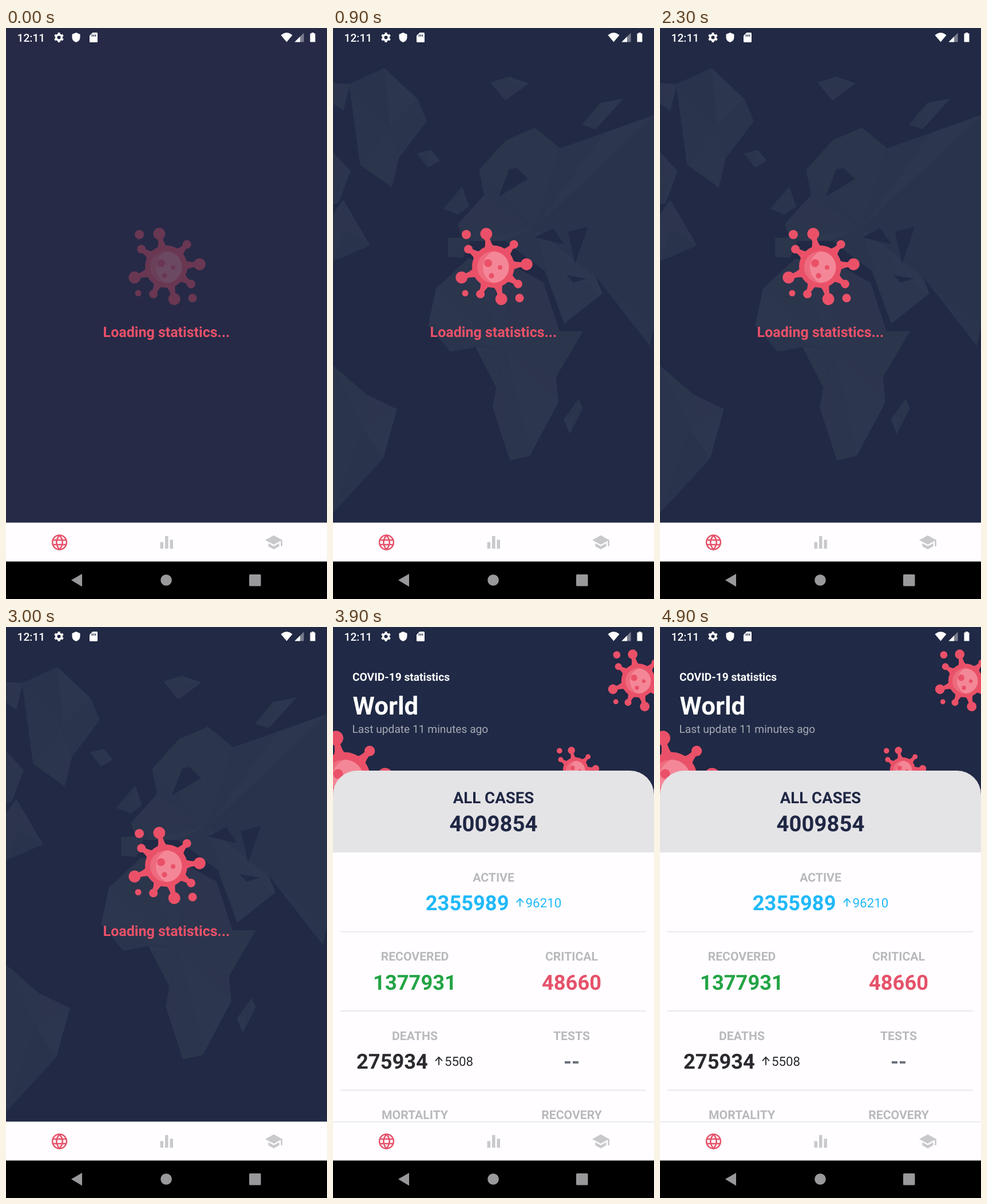
Recreate the animation shown at these times as an HTML page. Size 561x998 px, loop 5000 ms.

```html
<!DOCTYPE html>
<html lang="en">
<head>
<meta charset="utf-8">
<title>Statistics app</title>
<style>
html, body { margin: 0; width: 100%; height: 100%; overflow: hidden; background: #202945; }
svg { display: block; width: 100vw; height: 100vh; }
text { font-family: Roboto, Arial, sans-serif; text-rendering: geometricPrecision; }
.b { font-weight: 700; }
.m { text-anchor: middle; }
.label { font-size: 21.2px; fill: #b9b9bd; }
.num { font-size: 36.3px; }
.diff { font-size: 22.3px; text-anchor: end; }
</style>
</head>
<body>
<svg viewBox="0 0 561 998" preserveAspectRatio="none">
  <defs>
    <g id="virus"></g>
    <clipPath id="coast"></clipPath>
    <clipPath id="window"><rect y="394" width="561" height="470"/></clipPath>
  </defs>

  <g id="loading">
    <rect id="back" width="561" height="865" fill="#212944"/>
    <g id="map"></g>
    <use id="logo" href="#virus" x="280" y="417"/>
    <text class="b m" x="280.5" y="540" font-size="25" fill="#ea5168">Loading statistics...</text>
  </g>

  <g id="stats">
    <rect width="561" height="394" fill="#202945"/>
    <use href="#virus" transform="translate(533.5 93.5) scale(.8)"/>
    <use href="#virus" transform="translate(424 250) scale(.6)"/>
    <use href="#virus" transform="translate(20 264) scale(1.22)"/>
    <g fill="#fff">
      <text class="b" x="34" y="93.5" font-size="19.2">COVID-19 statistics</text>
      <text class="b" x="34.5" y="152.5" font-size="43.8">World</text>
      <text x="33.5" y="185" font-size="19.2" fill="#a6a9b5">Last update 11 minutes ago</text>
    </g>
    <path d="M0 394V293A42 42 0 0 1 42 251H519A42 42 0 0 1 561 293V394Z" fill="#e4e3e6"/>
    <g class="b m" fill="#1f2744">
      <text x="280.5" y="308" font-size="27.6">ALL CASES</text>
      <text x="280.5" y="356.5" font-size="38.3">4009854</text>
    </g>
    <rect y="394" width="561" height="471" fill="#fffdff"/>
    <g clip-path="url(#window)"><g id="list"></g></g>
  </g>

  <rect y="864.5" width="561" height="69" fill="#fffdff"/>
  <rect id="edge" y="864" width="561" height="1.5" fill="#e6e5e8"/>
  <g transform="translate(93.5 899)" fill="none" stroke="#e5526a" stroke-width="2.5">
    <circle r="12.4"/>
    <path d="M0 -12.4Q-10.4 0 0 12.4Q10.4 0 0 -12.4M-11.5 -4.1H11.5M-11.5 4.1H11.5"/>
  </g>
  <g fill="#c9c9cd">
    <path d="M269.5 898.5h5.5V910h-5.5zM278 888h5.5V910H278zM286.5 894.5H292V910h-5.5z"/>
    <path transform="translate(451.6 882.6) scale(1.364)" d="M5 13.18v4L12 21l7-3.82v-4L12 17l-7-3.82zM12 3L1 9l11 6 9-4.91V17h2V9L12 3z"/>
  </g>

  <rect y="932.5" width="561" height="66"/>
  <g fill="#99999c">
    <path d="M114 965L133 954V976.5Z"/>
    <circle cx="280" cy="965" r="9.8"/>
    <rect x="425" y="955" width="20.5" height="20.5" rx="1.5"/>
  </g>

  <g fill="#fff">
    <text x="19.5" y="23.8" font-size="19.2" font-weight="500">12:11</text>
    <g fill="none" stroke="#fff" transform="translate(92.5 16.5)">
      <circle r="4.8" stroke-width="3.6"/>
      <circle r="7.2" stroke-width="2.6" pathLength="12" stroke-dasharray="1" stroke-dashoffset="-.5"/>
    </g>
    <path d="M122.5 8L129.5 11V16C129.5 20.5 127 23.5 122.5 25C118 23.5 115.5 20.5 115.5 16V11Z"/>
    <path d="M151.5 8H158.5Q160 8 160 9.5V23.5Q160 25 158.5 25H147.5Q146 25 146 23.5V13.5Z"/>
    <path d="M150.5 11.5V15M153.5 11.5V15M156.5 11.5V15" stroke="#202945" stroke-width="1.5"/>
    <path d="M480.5 12.5Q490.5 4 500.5 12.5L490.5 24.5Z"/>
    <path d="M520.5 8.5V24.5H504.5Z" opacity=".4"/>
    <path d="M514 15V24.5H504.5Z"/>
    <path d="M534 8H538V9.5H540.5V24.5H531.5V9.5H534Z"/>
  </g>
</svg>
<script>
const $ = id => document.getElementById(id);
const RED = '#ea5168';
const circle = (x, y, r, fill = RED) => `<circle cx="${x}" cy="${y}" r="${r}" fill="${fill}"/>`;

// Virus: long and short arms alternate around a spotted body
const arm = (deg, i) => {
  const [len, r] = i % 2 ? [53, 7.5] : [58.5, 10.5];
  return `<g transform="rotate(${deg})">${circle(len, 0, r)}
    <path fill="${RED}" d="M34 -9Q39 -4 ${len} -4V4Q39 4 34 9Z"/></g>`;
};
$('virus').innerHTML = [-102, -47, -4, 35, 76, 115, 161, 215].map(arm).join('') +
  circle(-47, -56, 8) + circle(46, 55, 7.5) + circle(-49, 46.5, 5.5) +
  circle(0, 0, 37) + circle(-.5, 1, 27.5, '#ee6b7e') +
  '<path fill="#f48797" d="M0 -26.5A27.5 27.5 0 0 1 0 28.5A30 30 0 0 1 0 -26.5Z"/>' +
  circle(-9, -6, 7) + circle(12, 1.5, 4) + circle(-3, 16, 4.7);

// World map: rough coastlines, each cut into faintly shaded facets
const land = [
  '28,98 90,70 148,124 164,163 115,228 103,279 47,239',
  '0,96 30,98 18,145 0,132',
  '0,217 31,250 10,306 0,308',
  '0,325 18,300 65,380 0,408',
  '146,219 171,213 187,232 166,244',
  '275,95 308,85 342,97 301,127',
  '435,169 467,131 508,123 459,177',
  '192,316 226,277 238,312 218,326',
  '403,684 429,648 437,664 414,710',
  '0,590 58,640 112,666 88,752 0,848',
  '255,248 302,196 353,174 397,210 474,183 561,152 561,522 554,556 459,434 471,464 ' +
    '404,517 370,425 300,372 240,372 228,402 201,400 201,367 226,366 218,343 264,292',
  '166,520 180,455 236,403 305,410 368,445 396,530 437,530 390,610 394,654 344,748 309,756 279,663 285,628 249,558 205,566'
];
const seas = ['308,247 321,245 341,264 290,294', '353,366 385,350 404,378', '411,356 445,348 423,412', '408,432 444,438 420,445'];

let seed = 7;
const random = () => (seed = seed * 16807 % 2147483647) / 2147483647;
const poly = (pts, fill) => `<polygon points="${pts}" fill="${fill}"/>`;
const mean = (pts, axis) => pts.reduce((sum, p) => sum + +p.split(',')[axis], 0) / pts.length;
const facets = shape => {
  const pts = shape.split(' '), hub = `${mean(pts, 0)},${mean(pts, 1)}`;
  return pts.map((p, i) =>
    poly(`${hub} ${p} ${pts[(i + 1) % pts.length]}`, `rgba(255,255,255,${random() * .016})`)).join('');
};
const ground = land.map(p => poly(p, '#29334b')).join('');
$('coast').innerHTML = ground;
$('map').innerHTML = ground + `<g clip-path="url(#coast)">${land.map(facets).join('')}</g>` +
  seas.map(p => poly(p, '#212944')).join('');

// Statistics list
const text = (cls, x, y, s, fill = '') =>
  `<text class="${cls}" x="${x}" y="${y}" ${fill && `fill="${fill}"`}>${s}</text>`;
const LEFT = 143, MID = 280.5, RIGHT = 417, ROW = 138.5, GREY = '#6b717b';
const cells = [
  [0, MID, 'ACTIVE', '2355989', '#21b9f8', '96210'],
  [1, LEFT, 'RECOVERED', '1377931', '#23a445'],
  [1, RIGHT, 'CRITICAL', '48660', '#e5526a'],
  [2, LEFT, 'DEATHS', '275934', '#2b2a30', '5508'],
  [2, RIGHT, 'TESTS', '--', GREY],
  [3, LEFT, 'MORTALITY', '6.88%', GREY],
  [3, RIGHT, 'RECOVERY', '34.36%', GREY]
];
const cell = ([row, x, label, value, color, diff]) => {
  const y = 444.8 + row * ROW, base = y + 50.5;
  const head = text('b m label', x, y, label);
  if (!diff) return head + text('b m num', x, base, value, color);
  const half = (value.length * 21 + diff.length * 12.5 + 26) / 2;
  const end = x + half, tip = end - diff.length * 12.5 - 9;
  return head + text('b num', x - half - 1, base, value, color) +
    `<path d="M${tip} ${y + 44}v-14m-6 6.5l6 -6.5l6 6.5" fill="none" stroke="${color}" stroke-width="1.9"/>` +
    text('diff', end + 1, y + 45.5, diff, color);
};
const rule = i => `<rect x="13" y="${531.8 + i * ROW}" width="534" height="1.5" fill="#e3e2e5"/>`;
$('list').innerHTML = cells.map(cell).join('') + [0, 1, 2].map(rule).join('');

// Timeline
const LOOP = 5000, STEP = 100, SHOW = 3400, SCROLL = 83, GLIDE = 450;
const clamp = v => Math.min(1, Math.max(0, v));
const ease = p => p * p * (3 - 2 * p);

function draw(now) {
  const t = Math.floor(now % LOOP / STEP) * STEP, ready = t >= SHOW;
  $('loading').style.display = ready ? 'none' : '';
  $('stats').style.display = $('edge').style.display = ready ? '' : 'none';
  $('back').setAttribute('fill', t ? '#212944' : '#262a47');
  $('map').setAttribute('opacity', clamp(t / 250));
  $('logo').setAttribute('opacity', clamp(.34 + t / 250));
  const left = 1 - ease(clamp((t - SHOW) / GLIDE));
  $('list').setAttribute('transform', `translate(0 ${-SCROLL * left})`);
}

const start = performance.now();
function tick() {
  draw(performance.now() - start);
  requestAnimationFrame(tick);
}
tick();
</script>
</body>
</html>
```
